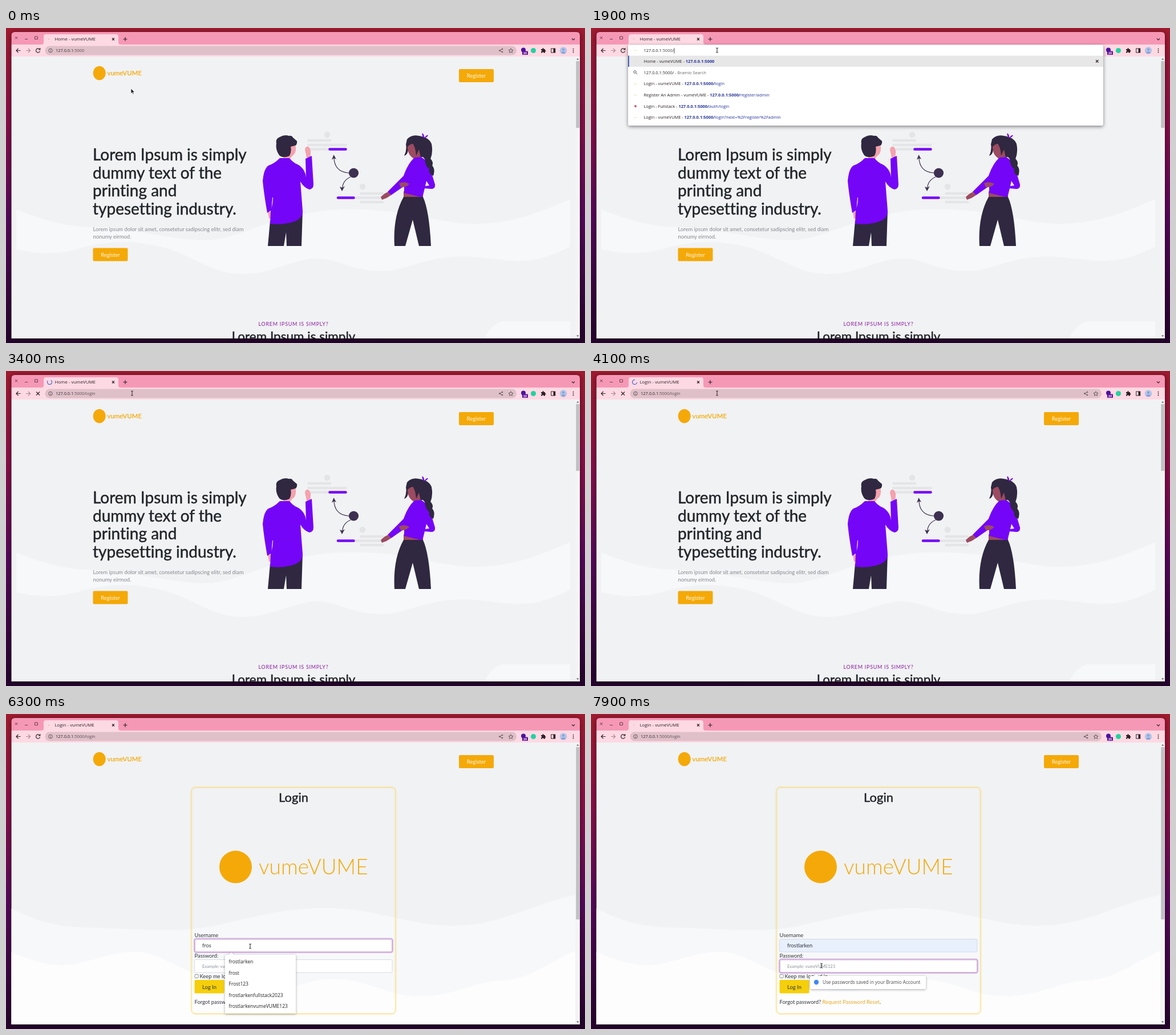
An HTML page for the animation above (8000 ms loop, 1015 px wide and 552 px high).

```html
<!DOCTYPE html>
<html lang="en">
<head>
<meta charset="utf-8">
<title>Login walkthrough</title>
<style>
html, body { margin: 0; width: 100%; height: 100%; overflow: hidden; background: #2a0630; }
svg { display: block; width: 100vw; height: 100vh; }
text { white-space: pre; font: 400 9.4px Lato, sans-serif; font-variant-ligatures: none; fill: #30353a; }
.ui, .ui text { font: 400 7.4px "Open Sans", sans-serif; fill: #2b2328; }
.item { font: 400 8.5px "Open Sans", sans-serif; fill: #222; }
.mid { text-anchor: middle; }
.head { font-size: 28px; fill: #212529; stroke: #212529; stroke-width: .45px; }
.muted { fill: #85898e; }
.hint { font-size: 7.5px; fill: #8a9096; }
.white { fill: #fff7e2; }
.brand { fill: #f4a908; }
.ink { fill: none; stroke: #33232a; stroke-width: 1.2; }
.dark { fill: #2f2840; }
.violet { fill: #7505f7; }
.skin { fill: #f4a2ae; }
.tan { fill: #9c4b61; }
.bars { stroke: #e4e5e6; stroke-width: 4.6; stroke-linecap: round; }
.drop { filter: drop-shadow(0 1px 2px #0005); }
.field { fill: #fff; stroke: #ced4da; stroke-width: .8; }
.ring { fill: none; stroke: #d5b5df; stroke-width: 3; }
.caret { stroke: #222; stroke-width: .8; }
</style>
</head>
<body>
<svg viewBox="0 0 1015 552">
<defs>
  <linearGradient id="desk" x1="0" y1="0" x2="0" y2="1">
    <stop offset="0" stop-color="#a11b2f"/><stop offset=".3" stop-color="#870f48"/>
    <stop offset=".6" stop-color="#56085a"/><stop offset="1" stop-color="#25042c"/>
  </linearGradient>
  <clipPath id="page"><path d="M9.5 50H1006V544H9.5z"/></clipPath>
</defs>
<path fill="url(#desk)" d="M0 0H1015V552H0z"/>
<rect x="9.5" y="7" width="996.5" height="537" rx="6" style="filter:drop-shadow(0 1px 4px #0008)"/>
<path fill="#f598b6" d="M9.5 29V13Q9.5 7 15.5 7H1000Q1006 7 1006 13V29z"/>
<path fill="#fdd9e3" d="M9.5 29H1006V50.5H9.5zM62 29Q66 29 66 25V15Q66 11 70 11H193Q197 11 197 15V25Q197 29 201 29z"/>

<g clip-path="url(#page)">
  <path fill="#f1f2f4" d="M9 50H1006V544H9z"/>

  <g data-on="0-4300">
    <path fill="#f7f8fa" d="M18 318C70 338 100 348 160 349S290 372 350 372S470 322 590 318S760 346 830 343S940 320 989 300V383C960 398 930 410 890 408S800 392 740 408S680 428 640 425S570 398 530 405S460 432 410 431S320 394 270 383S180 372 130 386S50 394 18 388z"/>
    <path fill="#f7f8fa" d="M838 544Q852 518 870 514H989V544z"/>
    <text class="head" x="152" y="232">Lorem Ipsum is simply</text>
    <text class="head" x="152" y="264">dummy text of the</text>
    <text class="head" x="152" y="295">printing and</text>
    <text class="head" x="152" y="327">typesetting industry.</text>
    <text class="muted" x="152.5" y="356">Lorem ipsum dolor sit amet, consetetur sadipscing elitr, sed diam</text>
    <text class="muted" x="152.5" y="369">nonumy eirmod.</text>
    <rect class="brand" x="152.5" y="385.5" width="61" height="23" rx="2"/>
    <text class="mid white" x="183" y="400.5">Register</text>
    <text class="mid" x="504" y="521.5" style="font-size:9px;letter-spacing:.7px;fill:#8a1c9d">LOREM IPSUM IS SIMPLY?</text>
    <text class="mid head" x="504" y="549" style="font-size:22.5px">Lorem Ipsum is simply</text>

    <g class="bars"><path d="M530.5 197H568M530.5 205H595.5M530.5 212.5H566M622.5 290H660M614 297.5H660M622.5 305H660"/>
      <path stroke="#7505f7" d="M567.5 212.5H595.5M582 297.5H609.5"/></g>
    <g fill="#e4e5e6"><circle cx="563" cy="187" r="5.3"/><circle cx="625" cy="278" r="5.3"/></g>
    <circle cx="609.5" cy="254" r="8.6" fill="#3d3050"/>
    <path fill="none" stroke="#3d3050" stroke-width="1.2" d="M601 254Q575 252 575 226M604 261Q590 267 589.5 282"/>
    <path fill="#3d3050" d="M574.5 222L579 230L575 228L571 231zM589 286L585 278L589.5 280L594 277z"/>

    <path class="dark" d="M463 338L520 320L518 382H492L491 358L487 382H459z"/>
    <path class="skin" d="M459 322L465 322L464 334L461 334zM496 204Q506 200 508 208Q509 220 502 224L497 230H486V212zM524 213Q525 207 530 208Q535 212 534 220L533 227H527z"/>
    <path class="violet" d="M480 228H497Q503 236 513 240Q522 246 525 256L526 262L525 229L536 224L539 274Q539 282 532 283Q522 280 516 269L520 320Q521 332 508 338Q488 346 463 343L464 320L458 324Q452 290 450 268Q452 246 460 241Q470 238 480 228z"/>
    <path fill="#f3f4f7" d="M467 297L468 297L467.5 306L465.5 316z"/>
    <path class="dark" d="M474 202Q472 194 480 191Q488 186 496 189Q501 188 503 192L510 198Q511 204 507 206L499 208Q501 216 497 224Q486 229 479 223Q472 213 474 202z"/>

    <path class="dark" d="M703 195Q711 186 724 189Q741 191 746 203Q749 218 744 230Q749 235 747 241Q752 250 749 258Q741 258 742 248Q733 240 736 232L731 226H719Q707 207 705 214Q704 222 698 224Q703 214 701 204z"/>
    <path class="tan" d="M704 208Q711 200 722 204L727 227L717 230Q704 224 704 208zM697 286L731 291V299H697z"/>
    <path class="violet" d="M716 227L728 226L736 232Q744 240 746 254L752 274Q753 282 745 282L734 281L730 297L698 289L698 277L675 293L669 287L697 259Q704 238 716 227z"/>
    <path class="tan" d="M689 272Q698 268 707 273Q702 280 692 279zM670 287L675 293L667 298L659 301L657 296L664 290z"/>
    <path class="dark" d="M697 296H731Q742 320 745 382H724L713 336L700 382H681Q678 330 697 296zM735 222Q732 240 742 247Q740 256 749 259Q753 247 747 241Q750 235 744 229zM711 200L724 192V213Q721 219 719 224Q718 207 711 200z"/>
    <path class="violet" d="M733 193Q728 188 730 184Q734 188 733 193Q737 187 740 188Q738 192 733 193z"/>
    <path fill="#f1f2f4" d="M737 268L742 276L735 277z"/>
  </g>

  <g data-on="4300-8000">
    <path fill="#f7f8fa" d="M9 341C50 360 80 373 140 374S290 384 350 374S470 340 560 340S710 373 790 371S930 330 998 317V544H9z"/>
    <path fill="#fdfdfe" d="M9 417C45 432 70 441 105 440S190 413 235 417S350 479 430 485S530 458 590 465S680 499 740 494S820 469 870 467S960 430 998 415V544H9z"/>
    <rect x="325" y="128.5" width="358" height="397" rx="7" fill="none" stroke="#f7da70" stroke-width=".9" style="filter:drop-shadow(0 .5px 1.5px #f5cf45b0)"/>
    <text class="mid head" x="504" y="154" style="font-size:22px">Login</text>
    <circle class="brand" cx="402.5" cy="268" r="28.5"/>
    <text class="brand" x="443" y="280.5" style="font-size:37px;font-weight:300">vumeVUME</text>
    <text x="330.5" y="391">Username</text>
    <text x="330.5" y="427">Password:</text>
    <rect id="userBox" class="field" x="330.5" y="394.5" width="346.5" height="22.5" rx="2"/>
    <rect data-on="0-7300" class="ring" x="330.5" y="394" width="347" height="23.5" rx="3"/>
    <text id="user" x="344" y="409"></text>
    <path id="userCaret" class="caret" d="M0 400V411.5"/>
    <rect class="field" x="330.5" y="430.5" width="346.5" height="22.5" rx="2"/>
    <rect data-on="7300-8000" class="ring" x="330.5" y="430" width="347" height="23.5" rx="3"/>
    <text class="hint" x="344" y="445">Example: vumeVUME123</text>
    <path data-on="7400-7900" class="caret" d="M344.5 436V447.5"/>
    <rect x="331" y="456.5" width="6" height="6" rx="1" fill="#fff" stroke="#767676" stroke-width=".8"/>
    <text x="339.5" y="463">Keep me logged in</text>
    <rect x="330.5" y="466" width="52" height="23.5" rx="2" fill="#f5cf0b"/>
    <text class="mid" x="356.5" y="481.5">Log In</text>
    <text x="330.5" y="508">Forgot password? <tspan fill="#e9a823">Request Password Reset</tspan>.</text>
    <g data-on="5300-6900">
      <path class="drop" fill="#fff" d="M386 422H391L395 418L399 422H506Q508 422 508 424V525H384V424Q384 422 386 422z"/>
      <path data-on="6400-6900" fill="#e9e9ea" d="M384 425H508V444H384z"/>
      <g id="names"></g>
    </g>
    <g data-on="7400-8000">
      <path class="drop" fill="#fff" d="M386 459H391L395 455L399 459H585Q587 459 587 461V480Q587 482 585 482H386Q384 482 384 480V461Q384 459 386 459z"/>
      <circle cx="395" cy="470" r="4.2" fill="#4285f4"/>
      <text class="item" x="406" y="473" style="font-size:8.1px;fill:#4a4a4a">Use passwords saved in your Bramio Account</text>
    </g>
  </g>

  <ellipse class="brand" cx="163.7" cy="79" rx="11" ry="12.3"/>
  <text class="brand" x="177.5" y="83" style="font-size:11.5px;stroke:#f4a908;stroke-width:.2px">vumeVUME</text>
  <rect class="brand" x="794" y="72" width="61" height="23" rx="2"/>
  <text class="mid white" x="824.5" y="87">Register</text>
  <path fill="#f4f4f5" d="M998.5 50H1006V544H998.5z"/>
  <path id="thumb" fill="#bfc0c2"/>
  <path fill="#606060" d="M1000 55.5L1002.2 53L1004.4 55.5zM1000 538.5L1002.2 541L1004.4 538.5z"/>
</g>

<g class="ui">
  <path fill="none" stroke="#6d3c4d" d="M15.8 15L20.2 19.4M20.2 15L15.8 19.4M33 19.5H38M50.5 15H55.5V19.5H50.5z"/>
  <g class="ink">
    <path d="M186 17.5L190 21.5M190 17.5L186 21.5M205.5 19.5H212.5M209 16V23M992 18.5L994.5 21L997 18.5"/>
    <path d="M25.5 39.5H18M21.5 36L18 39.5L21.5 43"/>
    <path stroke="#a98894" d="M35 39.5H42.5M39 36L42.5 39.5L39 43"/>
    <path data-on="0-3400,4600-8000" d="M59 37.2A3.6 3.6 0 1 0 59.6 40.5M59.8 35V38H56.8"/>
    <path data-on="3400-4600" d="M53 36.5L59 42.5M59 36.5L53 42.5"/>
  </g>
  <path data-on="0-3400,4600-8000" d="M74 19.5H76" stroke="#c8a58b" stroke-width=".8"/>
  <path id="spin" data-on="3400-4600" d="M80.5 20A4 4 0 1 1 77 15.5" fill="none" stroke="#3f5bd0" stroke-width="1.2"/>
  <text id="title" x="85.5" y="22.3" style="font-size:7.9px"></text>

  <rect id="pill" x="68.5" y="31.5" width="826.5" height="16" rx="8"/>
  <g fill="none" stroke="#4b3f44" stroke-width=".8"><circle cx="78" cy="39.5" r="3.3"/><path d="M78 39V41.5M78 37.3V38.1"/>
    <g data-on="0-800,3400-8000"><path d="M869.5 37L865.5 39.5L869.5 42"/><circle cx="870" cy="37" r=".9"/><circle cx="865.3" cy="39.5" r=".9"/><circle cx="870" cy="42" r=".9"/>
    <path d="M885 35.8L886.2 38.4L889 38.7L886.9 40.5L887.5 43.2L885 41.8L882.5 43.2L883.1 40.5L881 38.7L883.8 38.4z"/></g></g>
  <rect data-on="900-1500" x="86.5" y="34.5" width="51.5" height="10.5" fill="#a9c8f5"/>
  <text id="url" x="87" y="42"></text>

  <circle cx="907" cy="38.5" r="4" fill="#4a13a0"/>
  <rect x="905" y="40.5" width="10" height="6.5" rx="1" fill="#5a0a94"/>
  <text class="mid" x="910" y="46" style="font-size:5.5px;font-weight:700;fill:#fff">20</text>
  <circle cx="924.5" cy="39.5" r="4.5" fill="#1fd3a0"/>
  <path fill="#2b2024" d="M938 37H940.3Q940.3 35 941.5 35T942.7 37H945V39.2Q946.5 39.2 946.5 40.3T945 41.4V43.5H942.6Q942.5 42 941.3 42T940 43.5H938V41.3Q939.5 41.3 939.5 40.2T938 39z"/>
  <rect x="955.7" y="36" width="7" height="7" fill="none" stroke="#2b2024"/><path fill="#2b2024" d="M959.5 36H963V43H959.5z"/>
  <circle cx="977" cy="39.5" r="6.2" fill="#b2c4e8"/><circle cx="977" cy="37.8" r="2" fill="#86a0d5"/><path fill="#86a0d5" d="M973 43.5Q977 38.5 981 43.5Q977 46 973 43.5z"/>
  <g fill="#2b2024"><circle cx="994.5" cy="36.7" r=".9"/><circle cx="994.5" cy="39.6" r=".9"/><circle cx="994.5" cy="42.5" r=".9"/></g>

  <g data-on="1900-3400">
    <rect x="65" y="29.5" width="833" height="141.5" rx="3" fill="#fff" style="filter:drop-shadow(0 2px 3px #0007)"/>
    <path fill="#e7e7e7" d="M65 48.5H898V68H65z"/><path fill="#3b54b4" d="M65 48.5H66.8V68H65z"/>
    <path class="ink" d="M885 56L889.5 60.5M889.5 56L885 60.5"/>
    <circle cx="77" cy="77" r="2.2" fill="none" stroke="#555"/><path d="M78.7 78.7L81 81" stroke="#555"/>
    <path stroke="#eadfae" stroke-width=".8" d="M75 39.5H81M75 58.5H81M75 98H81M75 117.5H81"/>
    <text id="typed" x="92.5" y="42" style="fill:#444"></text>
    <path id="typedCaret" class="caret" d="M0 35V44.5"/>
    <g id="rows"></g>
  </g>
</g>

<path id="arrow" d="M0 0V9L2.2 7L3.7 10.3L5.2 9.6L3.7 6.5H6.6z" fill="#222" stroke="#fff" stroke-width=".7"/>
<path id="beam" d="M-2 -4Q0 -4 0 -3Q0 -4 2 -4M0 -3V3M-2 4Q0 4 0 3Q0 4 2 4" fill="none" stroke="#222"/>
</svg>

<script>
const $ = id => document.getElementById(id);
const LOOP = 8000, STEP = 100;
const HOST = '127.0.0.1:5000', BRAND = 'vumeVUME', USER = 'frostlarken';
const timed = [...document.querySelectorAll('[data-on]')].map(el =>
  [el, el.dataset.on.split(',').map(r => r.split('-').map(Number))]);

// Latest value whose start time has passed.
const at = (t, list) => list.reduce((now, [start, value]) => t >= start ? value : now, '');
const show = (el, on) => { el.style.display = on ? '' : 'none'; };
const put = (id, html) => { const el = $(id); if (el.last !== html) el.innerHTML = el.last = html; };
const bold = s => s.replace(/\*(.+?)\*/g, '<tspan font-weight="700">$1</tspan>');

const PATH = [[0, 219, 106], [300, 219, 106], [600, 221, 39], [4100, 221, 39], [4700, 422.5, 298.5],
  [5900, 422.5, 298.5], [6200, 428, 407], [6300, 428, 407], [6500, 408, 435], [6800, 408, 435], [7100, 404, 441], [8000, 404, 441]];
const TYPED = [[1900, '/'], [2200, '/l'], [2300, '/lo'], [2500, '/log'], [2700, '/logi'], [2800, '/login']];
const NAME = [[5200, 'f'], [5300, 'fr'], [5400, 'fro'], [5700, 'fros'], [6400, USER]];

function pointer(t) {
  const i = Math.max(1, PATH.findIndex(p => p[0] >= t));
  const [t0, x0, y0] = PATH[i - 1], [t1, x1, y1] = PATH[i];
  const k = (t - t0) / (t1 - t0);
  return [x0 + (x1 - x0) * k, y0 + (y1 - y0) * k];
}

// In a line, *…* is bold, | starts the address and ~ starts the grey part.
function suggestions(path) {
  const n = path.length - 1, word = 'Login';
  const title = n ? `*${word.slice(0, n)}*${word.slice(n)}` : word;
  const url = `*${HOST}${path}*`, rest = 'login'.slice(n);
  const own = `${title} - ${BRAND} - |${url}${rest}`;
  const search = `${HOST}${path}~ - Bramio Search`;
  const next = '?next=%2Fregister%2F';
  const plain = `Login - ${BRAND} - |*${HOST}/*login`;
  const admin = `Register An Admin - ${BRAND} - |*${HOST}/*register/admin`;
  const full = `${title} - Fullstack - |*${HOST}/*auth/${n ? `*${path.slice(1)}*` : ''}${rest}`;
  if (!n) return [`Home - ${BRAND} - |*${HOST}*`, search, plain, admin, full, `${plain}${next}admin`];
  if (n < 4) return [own, search, `${plain}${next}admin`, admin, full, `${plain}${next}student`];
  return [own, search, `${own}${next}admin`, `${own}${next}student`,
    `${title} - Flask Templates - |${url}${rest}?next=%2Fhome`, `${title} - eCommerce - |${url}${rest}?next=%2Fproduct-detail`];
}

function rowIcon(i, y, globes) {
  if (i < 4) return '';
  if (globes) return `<circle cx="78" cy="${y}" r="3.5" fill="#5b5f66"/><path d="M76 ${y - 1.5}l2 1l-1 2M79 ${y - 2.5}l1 2" stroke="#fff" fill="none" stroke-width=".9"/>`;
  return i === 4 ? `<circle cx="78" cy="${y}" r="2" fill="#d9576a"/>` : `<path d="M75 ${y}h6" stroke="#eadfae" stroke-width=".8"/>`;
}

function rowsHtml(path) {
  return suggestions(path).map((line, i) => {
    const y = 61 + i * 19.65;
    const html = bold(line).replace(/\|(.*)$/, '<tspan fill="#25339b">$1</tspan>').replace(/~(.*)$/, '<tspan fill="#666">$1</tspan>');
    return `${rowIcon(i, y - 2.5, path.length > 4)}<text x="92.5" y="${y}">${html}</text>`;
  }).join('');
}

function caretAfter(caret, text, on) {
  show(caret, on);
  if (on) caret.setAttribute('transform', `translate(${+text.getAttribute('x') + text.getComputedTextLength() + .6} 0)`);
}

put('names', [USER, 'frost', 'Frost123', USER + 'fullstack2023', USER + BRAND + '123']
  .map((s, i) => `<text class="item" x="390.5" y="${437 + i * 19.6}">${s}</text>`).join(''));

function draw() {
  const t = Math.floor(performance.now() % LOOP / STEP) * STEP;
  for (const [el, spans] of timed) show(el, spans.some(([a, b]) => t >= a && t < b));

  put('title', `${t < 3900 ? 'Home' : 'Login'} - ${BRAND}`);
  put('url', `127.0.0.1<tspan fill="#5f5058">:5000${t < 3400 ? '' : '/login'}</tspan>`);
  $('pill').setAttribute('fill', t >= 800 && t < 3400 ? '#fff' : '#dfc0c9');
  $('spin').setAttribute('transform', `rotate(${(t - 4100) * .6} 76.5 19.5)`);
  $('thumb').setAttribute('d', `M999.3 58H1005.3V${t < 4300 ? 175 : 360}H999.3z`);

  const path = at(t, TYPED);
  if (path && t < 3400) {
    put('typed', `<tspan fill="#222">127.0.0.1</tspan>:5000${path}`);
    put('rows', rowsHtml(path));
    caretAfter($('typedCaret'), $('typed'), true);
  }

  const name = at(t, NAME), user = $('user');
  user.setAttribute('class', name ? '' : 'hint');
  put('user', name || 'nyokalimbeto');
  $('userBox').style.fill = t >= 6400 ? '#e8f0fe' : '#fff';
  if (name) caretAfter($('userCaret'), user, t < 6200);
  else {
    show($('userCaret'), t >= 5000);
    $('userCaret').setAttribute('transform', 'translate(344.5 0)');
  }

  const beam = t >= 600 && t < 4200 || t >= 6200 && t < 6400 || t >= 6900;
  const [x, y] = pointer(t);
  for (const [id, on] of [['arrow', !beam], ['beam', beam]]) {
    show($(id), on);
    $(id).setAttribute('transform', `translate(${x} ${y})`);
  }
  requestAnimationFrame(draw);
}
draw();
</script>
</body>
</html>
```
